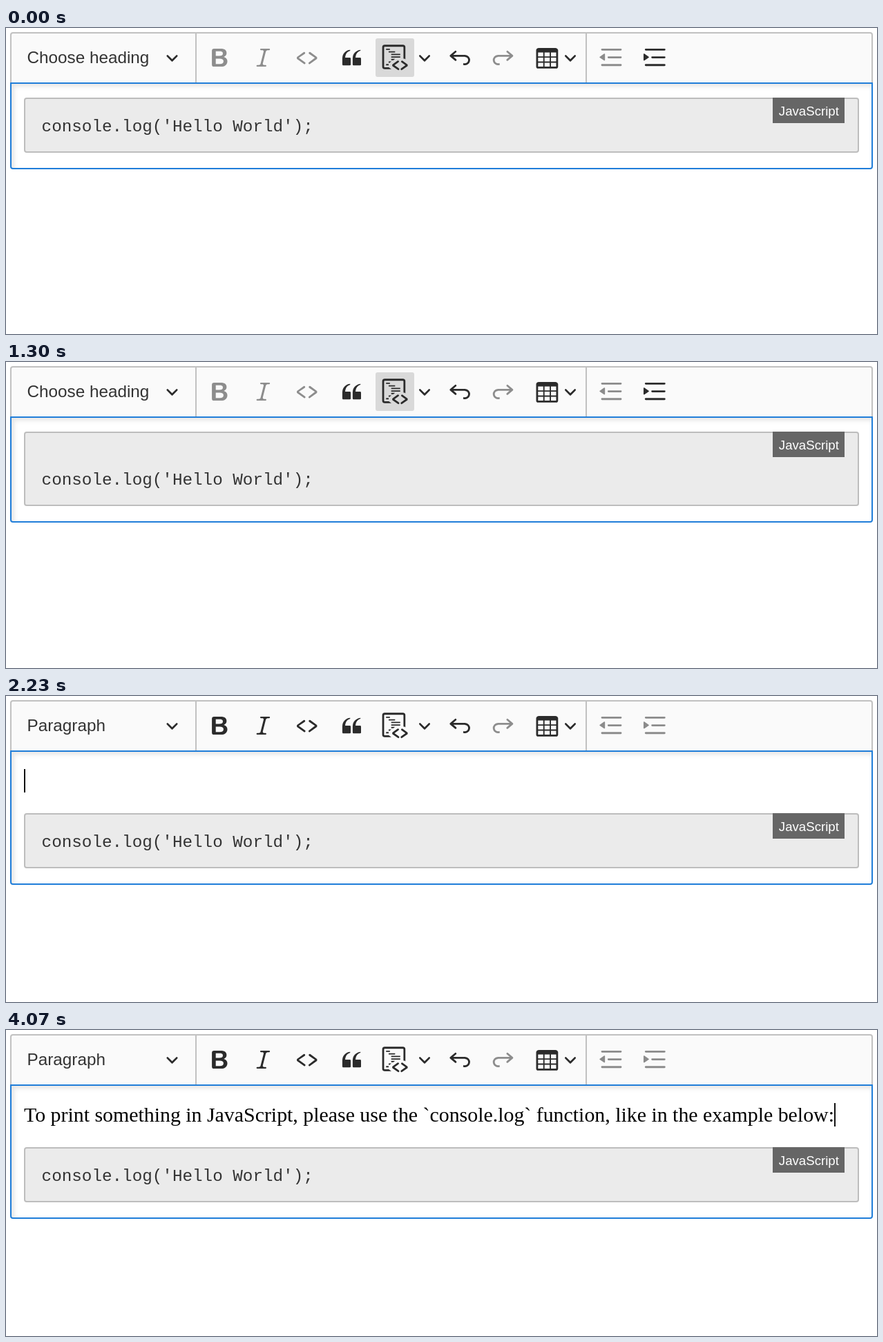
An HTML page for the animation above (4.11 s loop, 1261 by 444 pixels).

```html
<!DOCTYPE html>
<html lang="en">
<head>
<meta charset="utf-8">
<title>Code block editor</title>
<style>
  html, body { margin: 0; width: 100%; height: 100%; overflow: hidden; background: #fff; }
  #stage { position: absolute; left: 0; top: 0; width: 1261px; height: 444px; overflow: hidden; }
  #stage > div, #stage > svg { position: absolute; box-sizing: border-box; }
  #bar { left: 6px; top: 6px; width: 1249px; height: 75px; background: #fafafa;
         border: 2px solid #c1c1c1; border-radius: 4px 4px 0 0; }
  #edit { left: 6px; top: 79px; width: 1249px; background: #fff; border: 2px solid #1f7dd9;
          border-radius: 0 0 4px 4px; box-shadow: inset 4px 4px 6px rgba(0, 0, 0, .1); }
  #block { left: 26px; width: 1209px; background: #ebebeb; border: 2px solid #bdbdbd; border-radius: 4px; }
  #label { left: 1110px; width: 104px; height: 37px; background: #666; }
  #caret { width: 2px; background: #111; }
  svg { left: 0; top: 0; }
  .ui { font-family: "Liberation Sans", Arial, sans-serif; }
  #head { font-size: 24.27px; fill: #333; }
  #lang { font-size: 18.67px; fill: #fff; }
  #code { font: 24.27px "Liberation Mono", Courier, monospace; fill: #333; }
  #para { font: 29.87px "Liberation Serif", Times, serif; fill: #000; }
</style>
</head>
<body>
<div id="stage">
  <div id="bar"></div>
  <div id="edit"></div>
  <div id="block"></div>
  <div id="label"></div>
  <svg width="1261" height="444" viewBox="0 0 1261 444">
    <path d="M275 8V79M840 8V79" stroke="#c1c1c1" stroke-width="2"/>
    <rect id="active" x="535" y="15" width="56" height="56" rx="3" fill="#d9d9d9"/>
    <g id="icons" fill="#2b2b2b"></g>
    <text id="head" class="ui" x="30.6" y="50.5"></text>
    <text id="lang" class="ui" x="1118.8">JavaScript</text>
    <text id="code" x="51.6">console.log('Hello World');</text>
    <text id="para" x="26" y="132.5">To print something in JavaScript, please use the `console.log` function, like in the example below:</text>
  </svg>
  <div id="caret"></div>
</div>
<script>
const $ = id => document.getElementById(id);
const UNIT = 1.867, LOOP = 4110;

const undo = 'm5.042 9.367 2.189 1.837a.75.75 0 0 1-.965 1.149l-3.788-3.18a.747.747 0 0 1-.21-.284.75.75 0 0 1 .17-.945L6.23 4.762a.75.75 0 1 1 .964 1.15L4.863 7.866h8.917A.75.75 0 0 1 14 7.9a4 4 0 1 1-1.477 7.718l.344-1.489a2.5 2.5 0 1 0 1.094-4.73l.008-.032z';
const lines = 'M2.75 3h14.5a.75.75 0 0 1 0 1.5H2.75a.75.75 0 0 1 0-1.5zM7.75 9h9.5a.75.75 0 0 1 0 1.5h-9.5a.75.75 0 0 1 0-1.5zM2.75 15h14.5a.75.75 0 0 1 0 1.5H2.75a.75.75 0 0 1 0-1.5z';
const arrow = 'M.941 4.523a.75.75 0 1 1 1.06-1.06l3.006 3.005 3.005-3.005a.75.75 0 1 1 1.06 1.06l-3.549 3.55a.75.75 0 0 1-1.168-.136z';
const glyphs = {
  bold: 'M10.2 17H5.8C4.5 17 4 16.5 4 15.3V4.7C4 3.5 4.5 3 5.8 3h4.7c2.1 0 3.1.2 4 1.1.6.7.9 1.4.9 2.4 0 1.4-.8 2.4-2.2 3C15.1 10.2 16 11.300 16 13c0 1.600-.9 2.900-2.300 3.500-.9.400-1.900.500-3.500.500zM10 10.800H7v4.100h3.100c2 0 2.900-.7 2.900-2.100s-1-2-3-2zM7 5.100v3.600h2.600c1.900 0 2.900-.5 2.900-1.900 0-1.300-.9-1.700-3.200-1.700z',
  italic: 'M9.600 14.600c0 .5.200.9.700 1.200h1.450a.6.6 0 1 1 0 1.200H5.300a.6.6 0 0 1 0-1.200h1.150c.9-.1 1.200-.400 1.410-.930l2.420-9.550c0-.600-.250-.930-.720-1.120H8.150a.6.6 0 0 1 0-1.200h6.440a.6.6 0 1 1 0 1.200H13.400c-.700.100-1 .400-1.450 1.090z',
  tag: 'm12.500 5.700 5.200 3.900v1.300l-5.600 4c-.1.2-.3.2-.5.2-.3-.1-.6-.7-.6-1l.3-.4 4.700-3.500L11.500 7l-.2-.2c-.1-.3-.1-.6 0-.8.2-.2.5-.4.8-.4zm-5.200 0L2 9.600v1.300l5.600 4c.1.2.3.2.5.2.3-.1.7-.7.6-1l-.2-.4-5-3.500L8.200 7l.2-.2c.1-.3.1-.6 0-.8-.2-.2-.5-.4-.8-.4z',
  quote: [3, 11].map(x => `M${x} 10.4a6.5 6.5 0 0 1 6.056-6.400l.038.670c-2.646.740-3.740 2.980-3.874 5.330H${x + 6}q.5 0 .5.9v4.600q0 .500-.9.500h-5.100q-.500 0-.500-.900z`).join(''),
  block: 'M12.900 12.600a.75.75 0 0 1-.200 1.050l-3.160 2.260 3.410 2.410a.75.75 0 0 1-.870 1.230l-4.270-3.020v-1.230l4.010-2.870a.75.75 0 0 1 1.080.170zM15.760 12.440l4.010 2.870v1.220l-4.270 3.020a.75.75 0 0 1-.870-1.230l3.410-2.410-3.150-2.260a.75.75 0 0 1 .870-1.210zM16 0a2 2 0 0 1 2 2v9.350l-.660-.490H16.500V2a.5.5 0 0 0-.5-.5H2a.5.5 0 0 0-.5.5v15a.5.5 0 0 0 .5.5h3.120L7.160 19H2a2 2 0 0 1-2-2V2a2 2 0 0 1 2-2zM3 15h2v1H3zM5 13h2.200l-1.470 1H5zM7 11h3l-1.330 1H7zM7 9h7v1H7zM7 7h7v1H7zM5 5h5v1H5zM3 3h3v1H3z',
  undo,
  redo: undo,
  table: 'M3.500 2.500h13q1.500 0 2 1.500v13a1.500 1.500 0 0 1-1.500 1.500H3A1.500 1.500 0 0 1 1.500 17V4q.500-1.500 2-1.500z' +
    [3, 8, 13].map(x => [6, 10, 14].map(y => `M${x} ${y}h4v3h-4z`).join('')).join(''),
  outdent: lines + 'M4.370 6.950.980 9.360a.4.4 0 0 0 .013.660l3.390 2.200A.4.4 0 0 0 5 11.890V7.275a.4.4 0 0 0-.630-.325z',
  indent: lines + 'M1.632 6.950 5.020 9.360a.4.4 0 0 1-.013.660l-3.390 2.200A.4.4 0 0 1 1 11.890V7.275a.4.4 0 0 1 .632-.325z'
};

// name: [centre x, enabled inside the code block, enabled in a paragraph]
const buttons = {
  bold: [309.3, 0, 1], italic: [372.5, 0, 1], tag: [436, 0, 1], quote: [500, 1, 1], block: [563.3, 1, 1],
  undo: [657, 1, 1], redo: [719.7, 0, 0], table: [783.4, 1, 1], outdent: [876.5, 0, 0], indent: [939.8, 1, 0]
};

function addPath(d, transform) {
  const p = document.createElementNS('http://www.w3.org/2000/svg', 'path');
  p.setAttribute('d', d);
  p.setAttribute('fill-rule', 'evenodd');
  p.setAttribute('transform', transform);
  return $('icons').appendChild(p);
}

const icons = Object.entries(buttons).map(([name, [x, inCode, inPara]]) => {
  const flip = name === 'redo' ? -UNIT : UNIT;
  const el = addPath(glyphs[name], `translate(${x} 43) scale(${flip} ${UNIT}) translate(-10 -10)`);
  return { el, inCode, inPara };
});
for (const x of [240.5, 606, 817]) addPath(arrow, `translate(${x} 44) scale(${UNIT}) translate(-5 -5.8)`);

// block top, block height, code baseline
const layouts = {
  one: [101, 80, 150],
  two: [101, 108, 178],
  empty: [170, 80, 219],
  full: [170, 80, 219]
};
// caret x, y, height
const carets = {
  line1: [52, 127, 28],
  line2: [52, 155, 28],
  start: [26, 106, 34],
  end: [1199, 106, 34]
};
const steps = [
  [0, 'one'], [570, 'one', 'line1'], [1070, 'one'],
  [1300, 'two'], [1370, 'two', 'line2'], [1820, 'two', 'line1'],
  [2230, 'empty', 'start'], [2730, 'empty'],
  [3070, 'full', 'end'], [3570, 'full'], [4070, 'full', 'end']
];

function show([, layout, caret]) {
  const [top, height, base] = layouts[layout];
  const inCode = top < 170;
  $('block').style.top = $('label').style.top = top + 'px';
  $('block').style.height = height + 'px';
  $('edit').style.height = top + height + 24 - 79 + 'px';
  $('lang').setAttribute('y', top + 26);
  $('code').setAttribute('y', base);
  $('head').textContent = inCode ? 'Choose heading' : 'Paragraph';
  $('active').style.display = inCode ? '' : 'none';
  $('para').style.display = layout === 'full' ? '' : 'none';
  for (const i of icons) i.el.style.opacity = (inCode ? i.inCode : i.inPara) ? 1 : .53;

  const style = $('caret').style;
  style.display = caret ? '' : 'none';
  if (caret) [style.left, style.top, style.height] = carets[caret].map(v => v + 'px');
}

let current;
const begin = performance.now();
function tick() {
  const t = (performance.now() - begin) % LOOP;
  const step = steps.findLast(s => s[0] <= t) || steps[0];
  if (step !== current) show(current = step);
  requestAnimationFrame(tick);
}
tick();
</script>
</body>
</html>
```
